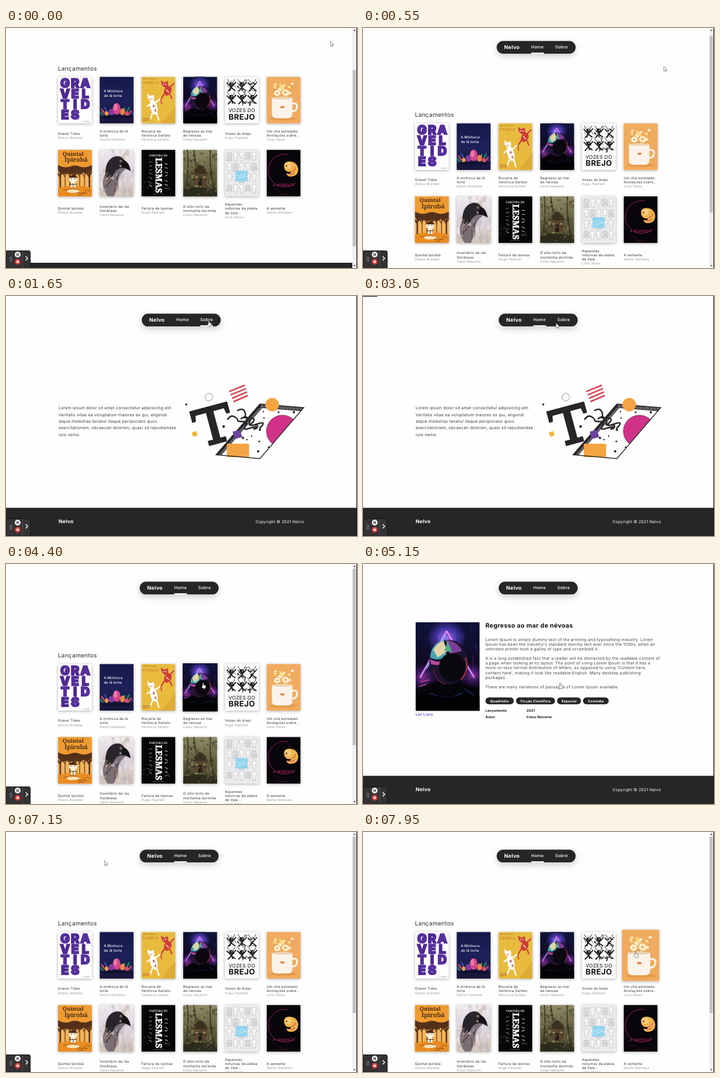
Recreate the animation shown at these times as an HTML page. Size 600 by 411 pixels, loop 8000 ms.

```html
<!DOCTYPE html>
<html lang="pt">
<head>
<meta charset="utf-8">
<title>Nelvo</title>
<style>
html, body { margin: 0; width: 100%; height: 100%; overflow: hidden; background: #fefefe; }
svg { display: block; }
text { font-family: Inter, "Open Sans", sans-serif; letter-spacing: .03em; text-rendering: geometricPrecision; white-space: pre; }
.serif { font-family: "Noto Serif", serif; letter-spacing: 0; }
.b { font-weight: 700; }
.x { font-weight: 900; letter-spacing: 0; }
.m { font-weight: 500; }
.mid { text-anchor: middle; }
.end { text-anchor: end; }
.card { filter: drop-shadow(0 1px 2.5px rgba(0,0,0,.32)); }
.nav { filter: drop-shadow(0 4px 6px rgba(0,0,0,.2)); }
</style>
</head>
<body>
<svg id="stage" width="600" height="411" viewBox="0 0 600 411"></svg>
<script>
const DARK = '#272528', BRAND = 'Nelvo', LOOP = 8000;
const stage = document.getElementById('stage');

// Drawing helpers: text is placed by the middle of its line.
const text = (x, y, s, size, fill = '#222', cls = '', more = '') =>
  `<text x="${x}" y="${y + size * .34}" font-size="${size}" fill="${fill}" class="${cls}" ${more}>${s}</text>`;
const rect = (x, y, w, h, fill, more = '') =>
  `<rect x="${x}" y="${y}" width="${w}" height="${h}" fill="${fill}" ${more}/>`;
const oval = (x, y, rx, ry, fill, more = '') =>
  `<ellipse cx="${x}" cy="${y}" rx="${rx}" ry="${ry}" fill="${fill}" ${more}/>`;
const shape = (d, fill, more = '') => `<path d="${d}" fill="${fill}" ${more}/>`;
const line = (d, color, w = 1, more = '') =>
  `<path d="${d}" fill="none" stroke="${color}" stroke-width="${w}" ${more}/>`;
const stops = list => list.map((c, i) => `<stop offset="${i / (list.length - 1)}" stop-color="${c}"/>`).join('');
const grad = (id, ...list) => `<linearGradient id="${id}" x2="0" y2="1">${stops(list)}</linearGradient>`;
const glow = (id, ...list) => `<radialGradient id="${id}">${stops(list)}</radialGradient>`;
const many = (n, fn) => Array.from({ length: n }, (_, i) => fn(i)).join('');
let seed = 7;
const rnd = (a, b) => a + (b - a) * ((seed = seed * 16807 % 2147483647) / 2147483647);
const pick = (...list) => list[Math.floor(rnd(0, list.length))];
const specks = (n, rx, ry, ...colors) =>
  many(n, () => oval(rnd(0, 58), rnd(0, 80), rnd(.8, rx), rnd(.8, ry), pick(...colors), 'opacity=".5"'));

// Covers, each 58 by 80
const covers = [
  rect(0, 0, 58, 80, '#fefefe') + many(11, i =>
    text(12 + i % 3 * 17.4, 11.6 + Math.floor(i / 3) * 18, 'GRAVELTIDES'[i], 21.5, i % 2 ? '#4d2890' : '#59309f', 'mid x',
      'stroke="#532c98" stroke-width="1.8"')) + text(54, 76.5, 'o. brandel', 2.6, '#555', 'end'),

  rect(0, 0, 58, 80, 'url(#night)') +
  text(7, 24, 'A Minhoca', 6, '#fff', 'm') + text(7, 32, 'de lã torta', 6, '#fff', 'm') +
  oval(29, 62, 26, 8, '#171542') +
  many(11, i => oval(6 + i * 4.7, 61 - i % 3 * 3, 1.8, 6, ['#23716f', '#b3475b', '#35409a', '#2f8f6b'][i % 4],
    `transform="rotate(${i * 9 - 45} ${6 + i * 4.7} 66)"`)) +
  oval(29, 55, 6.5, 10, '#d8458c') + oval(27, 52, 3, 6, '#ee79a9') + oval(20, 61, 4.5, 6, '#8a3aa4') +
  oval(39, 60, 4, 6, '#e98446') + oval(46, 63, 3, 4, '#cf4f77') + oval(12, 63, 3, 4, '#e6a24a') +
  shape('M2 68q27-6 54 0l-6 3H8z', '#12112f'),

  rect(0, 0, 58, 80, '#e8bb3f') + text(2, 4, 'UMA PITADA DE', 2.8, '#a8702c', 'b') +
  text(2, 10.5, 'CANELA', 6.4, '#cf7f2d', 'm') +
  shape('M34 80L58 50V80z', '#dfab35') +
  line('M38 31q-7 8-3 16', '#c93639', 1.6) + oval(45, 24, 6, 8.500, '#cf3b3b', 'transform="rotate(25 45 24)"') +
  shape('M35 14l-2-8 6 4 6-3 1 9q-5 6-11-2z', '#cf3b3b') + line('M49 18l7-7M40 28l-5 8M49 30l3 8', '#cf3b3b', 2.2) +
  oval(38, 13, 1, 1, '#fff') + oval(42, 13, 1, 1, '#fff') + line('M42 22l5 5', '#f0b7a5', 2) +
  shape('M11 37l-1-8 5 4 6-2 1 8q-6 6-11-2z', '#fff') +
  oval(21, 52, 6, 13, '#fff', 'transform="rotate(-14 21 52)"') +
  line('M23 45l9-7M19 62l-4 11M26 62l4 13M15 47l-6 4', '#fff', 2.4) +
  oval(21, 50, 1.8, 2.6, '#d5776b') + oval(24, 58, 1.6, 2.4, '#d5776b') + line('M13 37l3 2 3-2', '#a32b35', .7) +
  text(2, 72, 'VERÔNICA', 2.5, '#a84c22', 'b') + text(2, 75, 'SARTELO', 2.5, '#a84c22', 'b'),

  rect(0, 0, 58, 80, 'url(#space)') +
  many(26, () => rect(rnd(0, 56), rnd(0, 34), rnd(.4, 1), rnd(4, 16), pick('#1b3fb0', '#1d2c78', '#102a5c', '#5a2170'), 'opacity=".5"')) +
  oval(28, 14, 18, 16, 'url(#flare)', 'style="mix-blend-mode:screen"') +
  oval(6, 50, 16, 13, 'url(#ember)', 'style="mix-blend-mode:screen"') + oval(52, 48, 14, 12, 'url(#ember)', 'style="mix-blend-mode:screen"') +
  line('M28 8L4 50M28 8L53 50', '#a044e8', 2.6, 'opacity=".5"') + line('M28 8L4 50M28 8L53 50', '#f3a6f6', .9) +
  line('M27 12L10 42', '#58c4ff', .8) +
  shape('M0 80V64q12-12 22-9h16q13 1 20 13v12z', '#050509') +
  oval(30, 36, 17.5, 20, '#1b142c') + shape('M13 32q1-13 13-16-2 9 3 14-8 6-16 2z', '#47a3b4') +
  shape('M16 25q4-7 9-8l4 9-9 6z', '#e3d3a8') + shape('M27 16q11 1 15 10l-11 3z', '#7b3d97') +
  shape('M13 33q5 4 13 2l-4 4-8-1z', '#b64a9b') + shape('M29 17l4 10-7-1z', '#4faa8a') +
  oval(33, 41, 12, 13, '#0b0810') + line('M45 32q4 11-4 20', '#a8303c', 1.2) + line('M16 43q3 11 11 13', '#5d1e3b', 1) +
  line('M4 54l9-2M3 58l7-2', '#b8448b', .8) + line('M44 60l9 6M13 64q15 7 29 0', '#1f347a', .7) +
  rect(0, 66, 58, 14, '#000', 'opacity=".6"'),

  rect(0, 0, 58, 80, '#fbfbfb') +
  many(6, i => {
    const x = 11 + i % 3 * 18, y = 12 + Math.floor(i / 3) * 22;
    return oval(x, y, 3.5, 3, '#161616') + line(`M${x} ${y}l${rnd(-4, 4)} 12M${x - 6} ${y + 13}l6-6 7 5M${x - 8} ${y - 2}l8 8 8-9`, '#222', 2) +
      oval(x + 1, y, .9, .9, '#fff') + line(`M${x - 3} ${y - 2}l-4-6M${x + 3} ${y - 2}l3-6`, '#333', 1);
  }) +
  many(46, () => {
    const x = rnd(4, 53), y = rnd(6, 49);
    return line(`M${x} ${y}q${rnd(-5, 5)} ${rnd(-5, 5)} ${rnd(-6, 6)} ${rnd(-3, 5)}`, pick('#111', '#555', '#999', '#fff'), rnd(.4, 1.6));
  }) +
  text(29, 58, 'VOZES DO', 8.6, '#111', 'mid') + text(29, 68.800, 'BREJO', 13.2, '#111', 'mid b'),

  rect(0, 0, 58, 80, '#f1ab5e') + oval(29, 72, 24, 3, '#e49b4c') +
  line('M15 35Q10 20 16 10M27 36V14M36 36q9-10 8-20M22 35l-9-13', '#a39a58', .7) +
  many(16, () => oval(rnd(10, 44), rnd(11, 36), 2.6, 1.8, pick('#fff3dc', '#fbe3a6', '#f4cd6c', '#b9ab62'))) +
  oval(18, 28, 5.5, 5, '#fff2da') + oval(18, 28, 1.8, 1.6, '#e9ae4a') + oval(32, 27, 6, 5.5, '#fdecc9') + oval(32, 27, 2, 1.8, '#e9a33c') +
  oval(26, 18, 4, 4, '#f9dc94') +
  line('M43 46q10-2 9 6t-10 7', '#fbf3ea', 3) +
  shape('M9 36h35v27q0 8-8 8H17q-8 0-8-8z', '#fbf3ea') + oval(26.5, 36.5, 17, 2.4, '#eed3b2') +
  oval(27, 52, 3.6, 2, '#e18855') + many(10, () => oval(rnd(5, 54), rnd(4, 34), .5, .5, '#fde3b5')),

  rect(0, 0, 58, 80, '#ef9b30') + rect(0, 34, 58, 30, '#f3b55a') +
  text(26, 7, 'Quintal', 9.4, '#4a2c16', 'mid b serif') + text(31, 17, 'Ipirobá', 10.5, '#4a2c16', 'mid b serif') +
  shape('M0 26q10 6 20 3 9-4 18 0 10 3 20-3v10q-8 8-14 3-8 6-14 0-8 6-14 1-8 5-16-4z', '#54301a') +
  many(7, i => line(`M${4 + i * 8.3} 66V38m0 9l-5-8m5 5l5-7`, '#5b351b', i % 3 ? 1.2 : 2.6)) +
  shape('M0 80V65q29-7 58 0v15z', '#e98c22') + many(9, () => line(`M${rnd(0, 46)} ${rnd(67, 79)}q5-3 10 0`, '#8a4d1d', .9)) +
  oval(26, 50, 7, 6.5, '#fff5df') + rect(22, 55, 8, 10, '#fff5df', 'rx="2"') + line('M22 50h2m4 0h2M26 58v7M19 59h14', '#4a2b15', 1) +
  shape('M18 48q8-10 16 0z', '#4a2b15') + oval(26, 71, 11, 3, '#fbe2b6'),

  rect(0, 0, 58, 80, 'url(#mist)') + specks(40, 6, 9, '#f6f1f3', '#d9cfdb', '#c7b39f', '#b9b3bd') +
  shape('M14 80Q0 62 9 42L17 24q20-8 27 10-10 5-12 18-1 15-8 28z', '#6b6068', 'opacity=".85"') +
  shape('M10 45Q8 22 22 13q15-6 21 7 6 3 9 16-9-6-18-4-9 3-12 16-6 4-12-3z', '#29262b') +
  shape('M40 17q11 4 13 20-9-9-18-7z', '#141317') + oval(36, 19, 1.8, 1.6, '#c8a27a') + oval(36, 19, .8, .8, '#111') +
  many(22, () => line(`M${rnd(10, 32)} ${rnd(38, 68)}l${rnd(-7, 2)} ${rnd(6, 12)}`, pick('#3d363c', '#8b7462', '#b9aab2', '#a37b55'), rnd(.5, 1.6))) +
  specks(14, 3, 4, '#efe8ea', '#d8ab7f', '#eee'),

  rect(0, 0, 58, 80, '#060606') + text(29, 10, 'FARTURA DE', 4.8, '#eee', 'mid b serif') +
  text(29, 44, 'LESMAS', 14.5, '#fff', 'mid b serif', 'transform="rotate(90 29 44)" stroke="#fff" stroke-width=".6"') +
  many(14, i => line(`M${i % 2 ? 40 : 18} ${20 + i * 3.6}l${i % 2 ? 5 : -5} ${rnd(-3, 3)}`, '#bbb', rnd(.5, 1.3))) +
  many(14, () => line(`M${rnd(4, 48)} ${rnd(50, 70)}l${rnd(-5, 5)} ${rnd(-3, 3)}`, '#777', rnd(.4, 1))) +
  text(29, 76, 'hugo pastrelli', 2.6, '#999', 'mid'),

  rect(0, 0, 58, 80, 'url(#wood)') + specks(90, 4, 4, '#8d8a64', '#3c4129', '#a08d66', '#292a1c', '#5d4c31') +
  line('M7 0q4 34-4 80M47 0q-4 30 8 78M18 0l4 29', '#2c2a1d', 2, 'opacity=".8"') +
  shape('M17 42q2-14 12-16 11 3 13 17z', '#3a3020') + rect(19, 41, 21, 20, '#57462f') + rect(26, 49, 6, 12, '#201c14') +
  oval(23, 47, 1.5, 1.5, '#b9a569') + oval(36, 47, 1.5, 1.5, '#b9a569') + shape('M0 80V68q25-9 58 2v10z', '#2d2c1c') +
  specks(40, 2.5, 2.5, '#6e6846', '#23241a', '#8a744c'),

  rect(0, 0, 58, 80, '#ececee') +
  many(20, i => {
    const x = 4 + i % 5 * 10.6, y = 5 + Math.floor(i / 5) * 18.5, h = rnd(4, 9);
    return (i % 3 ? shape(`M${x} ${y}l2-1h3l2 1 1 4-2 1v${h}h-5V${y + 5}l-2-1z`, '#f6f6f6', 'stroke="#a2a2a4" stroke-width=".5"')
      : shape(`M${x} ${y}h7l1 ${h + 6}h-3l-1-7-2 7h-3z`, '#dededf', 'stroke="#9a9a9c" stroke-width=".5"')) +
      line(`M${x + 1} ${y + 14}h5`, '#b5b5b7', .4);
  }) + rect(18, 36, 21, 18, '#92d3ee') + line('M19 42l6 4 5-5 8 6M21 50l15-5', '#dff3fb', .9),

  rect(0, 0, 58, 80, '#08060a') + line('M36 8A28 28 0 1 0 50 56', '#a32468', .9) +
  line('M1 18A39 39 0 0 0 26 73', '#40152e', .6) +
  shape('M24 34q-2-10 8-11 14 0 16 13 0 12-12 13-8 0-8-6 6 3 8-2-10 1-12-7z', '#efb24c', 'transform="translate(6 -3)"') +
  oval(37, 27, 6, 6, '#f4cb74') + oval(34, 28, 1.2, 1.2, '#362019') + line('M42 37q6-1 8-7M39 42q5 1 9-3', '#d85c57', 1.4) +
  text(29, 60, 'A SEMENTE', 6.200, '#c22c78', 'mid') + text(29, 76, 'danilo ostrema', 2.4, '#8a2857', 'mid')
];

const A = { o: 'Otávio Brandel', d: 'Danilo Ostrema', v: 'Verônica Sartelo', c: 'Celso Navarim', h: 'Hugo Pastrelli', l: 'Lívia Tanso' };
const books = [
  ['Gravel Tides', A.o], ['A minhoca de lã', 'torta', A.d], ['Riscaria de', A.v, A.v],
  ['Regresso ao mar', 'de névoas', A.c], ['Vozes do brejo', A.h], ['Um chá estrelado:', 'Anotações sobre...', A.l],
  ['Quintal Ipirobá', A.o], ['Inventário de rãs', 'litorâneas', A.c], ['Fartura de lesmas', A.h],
  ['O sítio torto da', 'montanha dormida', A.c], ['Aquarelas', 'noturnas da aldeia', 'de Vale...', A.l], ['A semente', A.d]
];

const bookCard = (lines, i) => {
  const x = 88.8 + i % 6 * 71.35, row = Math.floor(i / 6), y = 171.2 + row * 125;
  const mid = row ? 400.6 : 272, last = lines.length - 1;
  return `<g id="book${i}" class="card"><use href="#cover${i}" x="${x}" y="${y}" width="58" height="80"/></g>` +
    lines.map((s, k) => text(x, mid + (k - last / 2) * 7.2, s, k < last ? 6 : 5.7, k < last ? '#333' : '#969696')).join('');
};

const nav = (dx, id) => `<g transform="translate(${dx} 0)">` +
  rect(228.5, 30.3, 135, 21.8, DARK, 'rx="10.9" class="nav"') +
  text(241.3, 41, BRAND, 8.9, '#fff', 'b') + text(287.5, 41, 'Home', 7.3, '#fff', 'm') +
  text(328.5, 41, 'Sobre', 7.3, '#fff', 'm') + (id ? rect(287.5, 50.2, 21.8, 2, '#fff', `id="${id}"`) : '') + '</g>';
const footer = (y, left, right) => rect(0, y, 600, 49.5, DARK) +
  text(left, y + 23.3, BRAND, 8.6, '#fff', 'b') + text(right, y + 23.5, `Copyright © 2021 ${BRAND}`, 6.9, '#fff', 'end');

const home = `<g id="home"><g id="page">${nav(0, 'homeMark')}${text(88.8, 157, 'Lançamentos', 10, '#2a2a2a')}` +
  books.map(bookCard).join('') + footer(489.7, 88.8, 503) + '</g>' +
  rect(592, 0, 8, 411, '#f1f1f1') + rect(592.6, 8, 5.6, 302, '#c1c1c1', 'id="thumb"') +
  shape('M593.6 5l2-2.4 2 2.4zM593.6 406l2 2.4 2-2.4z', '#555') + '</g>';

const lorem = ['Lorem ipsum dolor sit amet consectetur adipisicing elit.', 'Veritatis vitae ea voluptatum maiores ex qui, eligendi',
  'atque molestias tenetur itaque perspiciatis quos', 'exercitationem, obcaecati dolorem, quasi sit repudiandae', 'iure nemo.'];
const quad = 'M434 185L509 191 434 278.5 359 272z';
const dots = [[440, 198], [466, 199], [492, 199], [441, 209], [424, 227], [434, 229], [420, 240], [433, 249], [431, 266], [412, 246], [449, 259], [405, 243]];
const art =
  shape(quad, '#fefefe') + `<g clip-path="url(#quad)">` +
  line('M434 185L359 272', DARK, 15) +
  many(3, i => line(`M${437 + i * 2.3} 188L${362 + i * 2.3} 275`, '#fefefe', .6)) +
  line('M434 185L509 191', DARK, 13) + line('M436 188.5L509 194', '#fefefe', 5, 'stroke-dasharray=".6 1.8"') +
  oval(472.5, 231.5, 27.5, 27.5, '#d13188', 'stroke="#58223f" stroke-width=".6"') + '</g>' +
  rect(377.5, 253, 38, 23, '#f4a443') + line(quad, DARK, 1.4) +
  dots.map(([x, y], i) => oval(x, y, 1.2 + i % 3 * .4, 1.2 + i % 3 * .4, DARK)).join('') +
  oval(455, 186, 11.5, 11.5, '#f4a443') +
  rect(388.8, 230.5, 13.4, 13, '#6b439c', 'transform="rotate(-14 395.5 237)"') +
  line('M379 211q6-8 12-4t5 6 9 2 4 8 9 3 7 2M396 196q9-5 12 2t0 9 9 2 4 8 9 2 4 7M402 210q8-6 12 0t2 9 8 2 4 6', DARK, 2.5, 'stroke-linecap="round"') +
  `<g fill="${DARK}" transform="translate(346.8 194) rotate(-15)"><path d="M-33.5-5h67v20h-6.5l-2-10H6.5v47H16v9h-32v-9h9.5V5H-25l-2 10h-6.5z"/></g>` +
  many(4, i => line(`M${381.5 + i * 2.4} ${163.6 + i * 5.8}L${408.5 + i * 1.7} ${152.8 + i * 5.8}`, '#d9414f', 2.6)) +
  oval(346.7, 173, 6.5, 6.5, '#fefefe', 'stroke="#777" stroke-width=".8"') +
  rect(306.6, 184.2, 3, 3, DARK) + rect(370, 221.5, 4, 4, DARK, 'transform="rotate(20 372 223.5)"') +
  rect(318.6, 232.3, 7.8, 7.8, '#f0b536', 'transform="rotate(-20 322.5 236)"');
const about = '<g id="about">' + nav(3.5, 'aboutMark') + lorem.map((s, i) => text(90, 191.8 + i * 11.4, s, 7, '#3a3a3a')).join('') +
  art + footer(362.7, 90, 509.5) + '</g>';

const blurb = ['Lorem Ipsum is simply dummy text of the printing and typesetting industry. Lorem', "Ipsum has been the industry's standard dummy text ever since the 1500s, when an",
  'unknown printer took a galley of type and scrambled it.', '', 'It is a long established fact that a reader will be distracted by the readable content of',
  'a page when looking at its layout. The point of using Lorem Ipsum is that it has a', "more-or-less normal distribution of letters, as opposed to using 'Content here,",
  "content here', making it look like readable English. Many desktop publishing", 'packages.', '', 'There are many variations of passages of Lorem Ipsum available'];
const tags = [['Quadrinho', 209.3, 48.5], ['Ficção Científica', 261.5, 66.7], ['Espacial', 331.8, 40.8], ['Comédia', 376, 44]];
const detail = '<g id="detail">' + nav(3.5) +
  '<use href="#cover3" x="90" y="99.5" width="109.5" height="152"/>' +
  text(90, 257.2, 'Ler Livro', 6.8, '#2424d0') + text(209.2, 105.7, 'Regresso ao mar de névoas', 10.6, '#111', 'b') +
  blurb.map((s, i) => text(209.2, 129.5 + i * 8.1, s, 7, '#444')).join('') +
  tags.map(([s, x, w]) => rect(x, 228.6, w, 11.6, DARK, 'rx="5.8"') + text(x + w / 2, 234.5, s, 5.9, '#fff', 'mid b')).join('') +
  text(209.2, 250.7, 'Lançamento', 5.8, '#111', 'b') + text(279.5, 250.7, '2021', 5.8, '#111', 'b') +
  text(209.2, 261.7, 'Autor', 5.8, '#111', 'b') + text(279.5, 261.7, A.c, 5.8, '#111', 'b') + footer(362.7, 90, 509.5) + '</g>';

const recorder = shape('M.5 411V381.500H39q2.500 0 2.500 2.500v27z', '#333235', 'stroke="#161517"') +
  many(6, i => rect(6.3 + i % 2 * 2.6, 392.4 + Math.floor(i / 2) * 3, 1.3, 1.3, '#bbb')) +
  oval(20, 388, 5, 5, '#f4f4f4') + rect(18, 385.8, 1.4, 4.4, '#333') + rect(20.6, 385.8, 1.4, 4.4, '#333') +
  oval(20, 400.3, 5, 5, '#d93b3b') + rect(18.1, 398.4, 3.8, 3.8, '#fff') +
  line('M28.3 382v28', '#59585b', .8) + line('M33.6 391l3.4 3.5-3.4 3.5', '#fff', 1.5);

stage.innerHTML = '<defs>' + grad('night', '#15184a', '#1e2159', '#17163a') + grad('space', '#0d1338', '#120d2c', '#06050b', '#000') +
  grad('mist', '#efebee', '#dcd3dc', '#d2c3b4') + grad('wood', '#8d8a66', '#64603f', '#3d3a24') +
  glow('flare', '#9a6cf0', '#3a2488', '#000') + glow('ember', '#7a2a86', '#2a1046', '#000') +
  `<clipPath id="quad"><path d="${quad}"/></clipPath>` +
  covers.map((c, i) => `<symbol id="cover${i}" viewBox="0 0 58 80" preserveAspectRatio="none">${c}</symbol>`).join('') + '</defs>' +
  rect(0, 0, 600, 411, '#fefefe') + home + about + detail + rect(599, 0, 1, 411, '#111') +
  rect(0, 0, 0, 1, '#000', 'id="load"') + recorder +
  shape('M0 0v8l1.9-1.7 1.3 2.9 1.4-.6-1.3-2.8h2.6z', '#fff', 'id="arrow" stroke="#444" stroke-width=".6"') +
  shape('M-.9 5.5V.7q.9-1.2 1.8 0V3.7l3 .7q.9.3.6 1.6L3.9 9.8H-.3L-2.7 6.6q.5-1.1 1.8-1.1z', '#fff', 'id="hand" stroke="#333" stroke-width=".6"');

// Motion tables: [time, values...]
const pointer = [[0, 554.5, 22.8], [100, 554.5, 22.8], [800, 497.7, 83.3], [1150, 346, 43], [1750, 347, 42], [2050, 342, 43],
  [2350, 342, 43], [2750, 303, 43], [2940, 303, 43], [3050, 330, 46.5], [3500, 352, 90], [4050, 350, 130], [4280, 342, 165],
  [4400, 337, 203.5], [5150, 337, 203.5], [5750, 359, 107], [6050, 359, 107], [6450, 2, -14], [6850, 2, -14],
  [7600, 472, 164], [7750, 472, 166], [7950, 466, 205], [LOOP, 466, 205]];
const scroll = [[0, 87.7], [120, 87.7], [650, 0], [LOOP, 0]];
const loadBar = [[0, 0], [3000, 0], [3050, 24], [3200, 90], [3290, 600], [3300, 0], [4640, 0], [4690, 24], [4780, 110], [4840, 600], [4850, 0], [LOOP, 0]];
const pages = [[0, 'home'], [1300, 'about'], [3300, 'home'], [4920, 'detail'], [6700, 'home']];
const hands = [[1130, 2400], [2700, 2980], [4320, 5250], [7760, LOOP]];

const smooth = p => p * p * (3 - 2 * p);
const clamp = p => Math.min(1, Math.max(0, p));
function at(table, t, ease = smooth) {
  const i = Math.max(1, table.findIndex(k => k[0] > t)), a = table[i - 1], b = table[i];
  const p = ease((t - a[0]) / (b[0] - a[0]));
  return a.slice(1).map((v, k) => v + (b[k + 1] - v) * p);
}
const $ = id => document.getElementById(id);
const set = (id, name, value) => $(id).setAttribute(name, value);
const show = (id, on) => { $(id).style.display = on ? '' : 'none'; };
function grow(i, start, t) {
  const s = 1 + .1 * smooth(clamp((t - start) / 200)), cx = 117.8 + i % 6 * 71.35, cy = 211.2;
  set('book' + i, 'transform', `translate(${cx} ${cy}) scale(${s}) translate(${-cx} ${-cy})`);
}

function draw(t) {
  const page = pages.filter(p => p[0] <= t).pop()[1];
  ['home', 'about', 'detail'].forEach(id => show(id, id === page));
  const [y] = at(scroll, t);
  set('page', 'transform', `translate(0 ${-y})`);
  set('thumb', 'y', 8 + y * .73);
  set('aboutMark', 'x', t < 2960 ? 328.5 : 287.5);
  set('load', 'width', at(loadBar, t, p => p)[0]);
  grow(3, t < 6000 ? 4324 : LOOP, t);
  grow(5, 7750, t);
  const [px, py] = at(pointer, t), hand = hands.some(([a, b]) => t >= a && t < b);
  show('hand', hand);
  show('arrow', !hand);
  set(hand ? 'hand' : 'arrow', 'transform', `translate(${px} ${py})`);
}
function tick() {
  draw(performance.now() % LOOP);
  requestAnimationFrame(tick);
}
tick();
</script>
</body>
</html>
```
